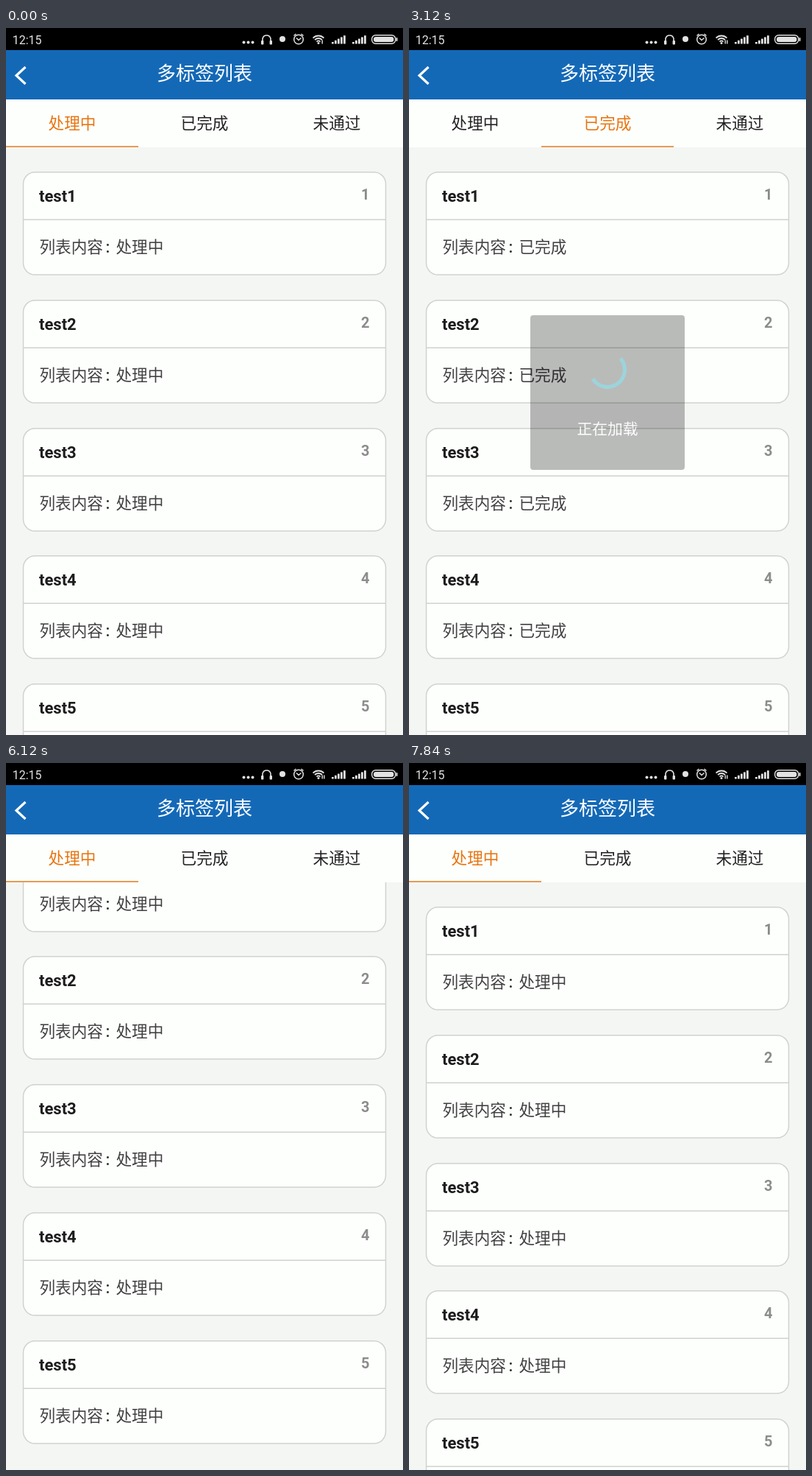
Animation of 540x960 px, one loop 7920 ms. Source, as an HTML page:

```html
<!DOCTYPE html>
<html lang="zh-CN">
<head>
<meta charset="utf-8">
<title>多标签列表</title>
<style>
html, body { margin: 0; width: 100%; height: 100%; overflow: hidden; background: #f4f6f4; }
svg { display: block; width: 540px; height: 960px; }
text { font-family: Roboto, "Noto Sans CJK SC", "Noto Sans CJK", sans-serif; }
.zh { font-family: "Noto Sans CJK SC", "Noto Sans CJK", sans-serif; font-weight: 300; }
.name { font-size: 22px; font-weight: 700; fill: #1c1c1c; }
.num { font-size: 20px; font-weight: 700; fill: #8b8c8b; text-anchor: end; }
.body { font-size: 21.6px; fill: #404040; }
.colon { font-size: 22px; font-weight: 500; fill: #333; }
.tab { font-size: 21.6px; text-anchor: middle; }
.card { fill: #fdfffd; stroke: #d0d2d0; stroke-width: 1.5; }
</style>
</head>
<body>
<svg id="stage" viewBox="0 0 540 960"></svg>
<script>
const LOOP = 7920;
const TABS = ["处理中", "已完成", "未通过"];
const PITCH = 173.75;
const LIST_END = 1063.5;

// [time, tab] switches; each one shows the loading panel
const SWITCHES = [[300, 1], [1400, 2], [2450, 1], [3240, 0]];

// [time, list offset]
const SCROLL = [
  [0, 0], [4120, 0], [4480, -106.5], [4780, -174], [5380, -174], [5560, -106.5],
  [6160, -106.5], [6460, 0], [6640, 0], [7080, 190], [7440, 190], [7760, 0], [LOOP, 0]
];

const stage = document.getElementById("stage");

function add(parent, tag, attrs = {}, text) {
  const el = document.createElementNS("http://www.w3.org/2000/svg", tag);
  set(el, attrs);
  if (text !== undefined) el.textContent = text;
  parent.appendChild(el);
  return el;
}

function set(el, attrs) {
  for (const key in attrs) el.setAttribute(key, attrs[key]);
}

const rect = (parent, x, y, width, height, fill, more) =>
  add(parent, "rect", { x, y, width, height, fill, ...more });
const path = (parent, d, stroke, width, more) =>
  add(parent, "path", { d, stroke, "stroke-width": width, fill: "none", ...more });
const circle = (parent, cx, cy, r, fill, more) =>
  add(parent, "circle", { cx, cy, r, fill, ...more });

const clamp = v => Math.max(0, Math.min(1, v));
const ease = v => v * v * (3 - 2 * v);

function valueAt(steps, t) {
  let i = 1;
  while (i < steps.length - 1 && t > steps[i][0]) i++;
  const [t0, a] = steps[i - 1], [t1, b] = steps[i];
  return a + (b - a) * ease(clamp((t - t0) / (t1 - t0)));
}

function arc(cx, cy, r, from, sweep) {
  const point = deg => {
    const a = deg * Math.PI / 180;
    return (cx + r * Math.cos(a)).toFixed(2) + " " + (cy + r * Math.sin(a)).toFixed(2);
  };
  return `M${point(from)}A${r} ${r} 0 ${sweep > 180 ? 1 : 0} 1 ${point(from + sweep)}`;
}

// Pull-down header
rect(stage, 0, 0, 540, 960, "#f4f6f4");
const header = rect(stage, 0, 162, 540, 0, "#bdc1bd");
const mascot = add(stage, "ellipse", { cx: 270, rx: 30, ry: 27, fill: "#fb9a32" });

// List
const cards = [], bodies = [];
for (let i = 0; i < 5; i++) {
  const card = add(stage, "g");
  add(card, "rect", { x: 23.5, y: 195.7, width: 493, height: 139.4, rx: 16, class: "card" });
  path(card, "M23.5 260.2H516.5", "#d0d2d0", 1.5);
  add(card, "text", { x: 45, y: 235.8, class: "name" }, "test" + (i + 1));
  add(card, "text", { x: 494.5, y: 233, class: "num" }, i + 1);
  add(card, "text", { x: 45.5, y: 305, class: "zh body" }, "列表内容");
  add(card, "text", { x: 135.5, y: 304.5, class: "colon" }, ":");
  bodies.push(add(card, "text", { x: 149.5, y: 305, class: "zh body" }));
  cards.push(card);
}

// Load-more footer
const footer = add(stage, "g");
rect(footer, 0, LIST_END, 540, 69, "#fdfffd");
const spokes = [];
for (let i = 0; i < 12; i++) {
  spokes.push(path(footer, "M0 -13V-22", "#777", 4, {
    "stroke-linecap": "round",
    transform: `translate(271 ${LIST_END + 35}) rotate(${i * 30})`
  }));
}

// Tab bar
rect(stage, 0, 97, 540, 65, "#fdfffd");
const tabs = TABS.map((label, i) =>
  add(stage, "text", { x: 90 + i * 180, y: 136.5, class: "zh tab" }, label));
const underline = rect(stage, 0, 160.3, 180, 1.5, "#e17a1e");

// Title bar
rect(stage, 0, 30, 540, 67, "#1469b7");
path(stage, "M26.5 53L14 64.5L26.5 76", "#fff", 3.2);
add(stage, "text", { x: 270, y: 71, class: "zh", "font-size": 26, fill: "#fff", "text-anchor": "middle" }, "多标签列表");

// Status bar
const INK = "#e2e2e2";
rect(stage, 0, 0, 540, 30, "#000");
add(stage, "text", { x: 8.7, y: 21.7, "font-size": 16, fill: INK }, "12:15");
for (const x of [323.5, 329.5, 335.5]) circle(stage, x, 19.5, 2, INK);
path(stage, "M349 21V14.5A5.6 5.6 0 0 1 360 14.5V21", INK, 1.6);
rect(stage, 347, 17, 3.4, 5.5, INK, { rx: 1 });
rect(stage, 358.6, 17, 3.4, 5.5, INK, { rx: 1 });
circle(stage, 376, 15, 4, INK);
circle(stage, 398, 15.5, 6.3, "none", { stroke: INK, "stroke-width": 1.5 });
path(stage, "M395 13.5L398 16.5L401.5 13.5M391.5 10.5L394.5 8M401.5 8L404.5 10.5", INK, 1.5);
for (const r of [3.5, 7, 10.5]) path(stage, arc(425, 21, r, -135, 90), INK, 1.8);
circle(stage, 425, 20.5, 1.5, INK);
path(stage, "M430.2 21.5V16.5", INK, 1.4);
const traffic = path(stage, "M432.8 16.5V21.5", INK, 1.4);
for (const x of [443, 471])
  for (let i = 0; i < 5; i++) {
    const h = 2.5 + i * 2.2;
    rect(stage, x + i * 4, 21.5 - h, 2.8, h, INK);
  }
rect(stage, 497.7, 9.7, 32, 11.6, "none", { rx: 5, stroke: INK, "stroke-width": 1.4 });
rect(stage, 500, 12, 27.4, 7, INK, { rx: 3 });
rect(stage, 530.5, 13, 2, 5, INK, { rx: 1 });

// Loading panel
const panel = add(stage, "g");
rect(panel, 165, 390, 210, 210, "#000", { rx: 4, "fill-opacity": 0.47 });
const ring = path(panel, "", "#52b4c4", 5);
add(panel, "text", { x: 270, y: 552, class: "zh", "font-size": 20.8, fill: "#fff", "text-anchor": "middle" }, "正在加载");

function draw(t) {
  let tab = 0, age = Infinity;
  for (const [time, next] of SWITCHES)
    if (t >= time) { tab = next; age = t - time; }

  tabs.forEach((el, i) => el.setAttribute("fill", i === tab ? "#e8740f" : "#222"));
  underline.setAttribute("x", tab * 180);
  for (const el of bodies) el.textContent = TABS[tab];

  const shown = Math.min(clamp(age / 120), clamp((750 - age) / 140));
  panel.setAttribute("opacity", shown);
  if (shown) ring.setAttribute("d", arc(270, 464, 23.5, -88 + age * 0.07, 75 + age * 0.17));

  // Cards sit on whole pixels while the list scrolls
  const y = valueAt(SCROLL, t);
  cards.forEach((el, i) =>
    el.setAttribute("transform", `translate(0 ${Math.round(i * PITCH + y)})`));
  header.setAttribute("height", Math.max(0, y));
  set(mascot, { cy: 162 + y - 49, visibility: y > 0 ? "visible" : "hidden" });

  set(footer, {
    transform: `translate(0 ${y.toFixed(2)})`,
    visibility: t > 4120 && t < 5560 ? "visible" : "hidden"
  });
  const head = Math.floor(t / 80);
  spokes.forEach((el, i) =>
    el.setAttribute("opacity", 1 - 0.6 * (((head - i) % 12 + 12) % 12) / 11));

  traffic.setAttribute("visibility", t > 800 ? "visible" : "hidden");
}

const start = performance.now();
function tick() {
  draw((performance.now() - start) % LOOP);
  requestAnimationFrame(tick);
}
draw(0);
requestAnimationFrame(tick);
</script>
</body>
</html>
```
